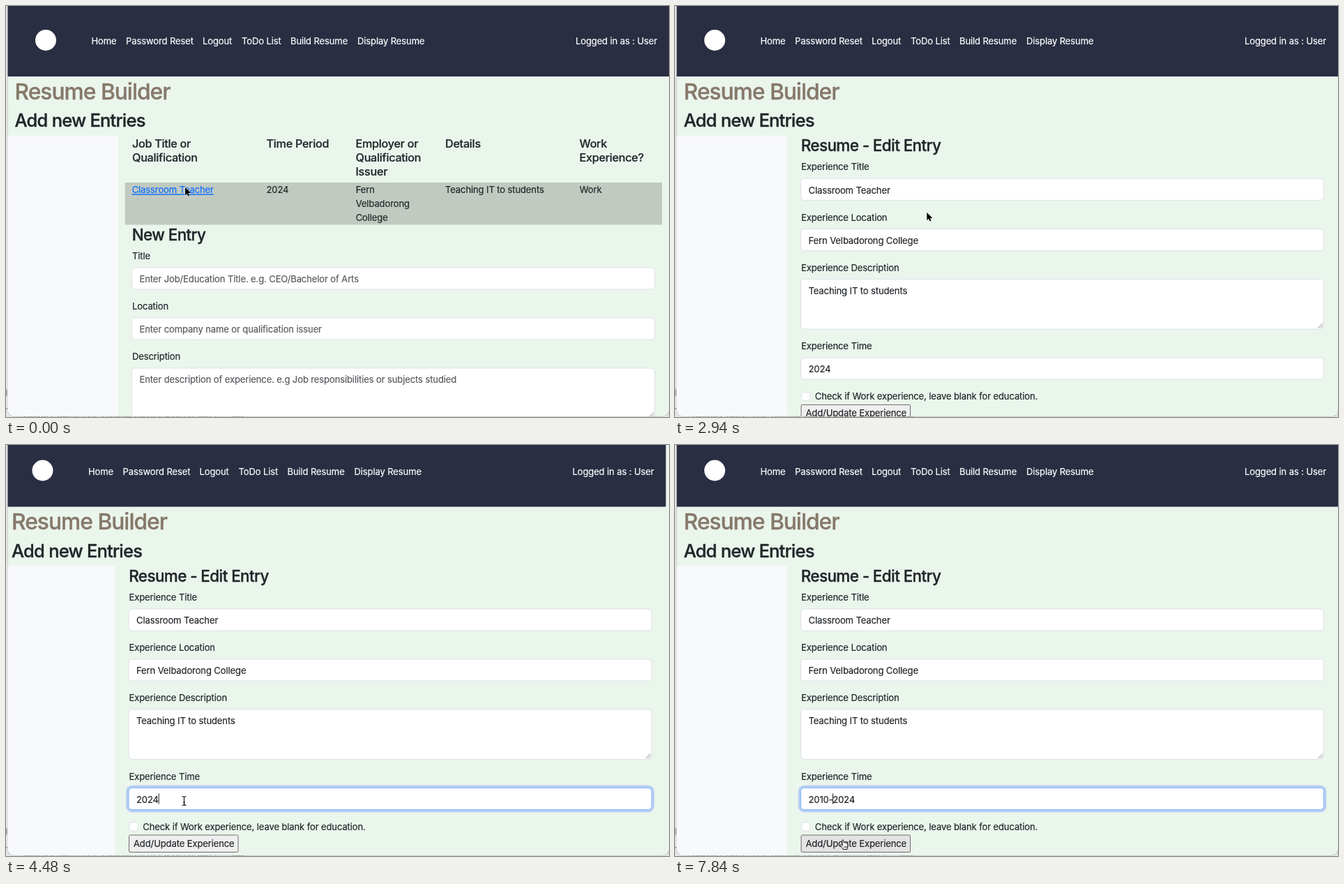
An HTML page for the animation above (8000 ms loop, 951 by 589 pixels).

```html
<!DOCTYPE html>
<html lang="en">
<head>
<meta charset="utf-8">
<title>Resume Builder</title>
<style>
html, body { margin: 0; width: 100%; height: 100%; overflow: hidden; background: #e4e5e7; }
svg { display: block; width: 951px; height: 589px; }
text {
  font: 400 13px Inter, Roboto, sans-serif;
  font-optical-sizing: none;
  letter-spacing: -.008em;
  color: #212529;
  fill: currentColor;
  stroke: currentColor;
  stroke-width: .2px;
  white-space: pre;
}
.nav { color: #fff; }
.h1, .h2, .h3 { font-weight: 500; stroke-width: .35px; }
.h1 { font-size: 31.7px; letter-spacing: -.03em; color: #86786a; }
.h2 { font-size: 25.5px; letter-spacing: -.03em; }
.h3 { font-size: 22.4px; letter-spacing: -.025em; }
.h5 { font-size: 16.2px; font-weight: 500; letter-spacing: -.018em; }
.hint { color: #585b5f; }
.link { color: #0d6efd; text-decoration: underline; }
.link.hover { color: #0a58ca; }
.url { font-size: 10.8px; color: #27303f; }
.behind { font: 9px "Noto Sans Mono", monospace; color: #444; }
.field { fill: #fff; stroke: #dee2e6; }
.grip { fill: none; stroke: #777; stroke-width: .9; }
</style>
</head>
<body>
<svg id="stage" viewBox="0 0 951 589">
  <defs>
    <clipPath id="frame"><rect x="2.5" y="-20" width="948.5" height="608" rx="9"/></clipPath>
  </defs>
</svg>
<script>
const NS = 'http://www.w3.org/2000/svg';
const stage = document.getElementById('stage');

function add(parent, tag, attrs = {}, content) {
  const node = document.createElementNS(NS, tag);
  for (const key in attrs) node.setAttribute(key, attrs[key]);
  if (content !== undefined) node.textContent = content;
  parent.appendChild(node);
  return node;
}
const rect = (parent, x, y, width, height, attrs) => add(parent, 'rect', { x, y, width, height, ...attrs });
const text = (parent, x, y, content, cls = '') => add(parent, 'text', { x, y, class: cls }, content);
const lines = (parent, x, y, list, cls) => list.forEach((s, i) => text(parent, x, y + i * 20, s, cls));

function field(parent, y, height, content, cls) {
  const box = rect(parent, 180.5, y, 750, height, { rx: 5, class: 'field' });
  const label = text(parent, 191.5, y + 21, content, cls);
  if (height > 40) {
    const b = y + height;
    add(parent, 'path', { d: `M922.5 ${b - 1.5}l6.5-6.5M926 ${b - 1.5}l3-3`, class: 'grip' });
  }
  return { box, label };
}

// Behind the window
add(stage, 'circle', { cx: -4, cy: 554, r: 7, fill: '#a9a9ab' });
rect(stage, 0, 576.5, 3, 1, { fill: '#555' });
text(stage, 25, 590, 'contents tools, list training entries details, notes.   page  ', 'behind');
rect(stage, 2, -20, 949.5, 608.5, { rx: 9, fill: '#b4b6ba' });

// Page
const win = add(stage, 'g', { 'clip-path': 'url(#frame)' });
rect(win, 0, 0, 951, 589, { fill: '#eaf5ec' });
const page = add(win, 'g');
rect(page, 0, 0, 951, 101, { fill: '#2a2e43' });
add(page, 'circle', { cx: 57, cy: 49, r: 15, fill: '#fff' });
[[122.5, 'Home'], [172, 'Password Reset'], [282, 'Logout'], [338, 'ToDo List'],
  [408, 'Build Resume'], [504, 'Display Resume']].forEach(([x, s]) => text(page, x, 55, s, 'nav'));
text(page, 934, 55, 'Logged in as : User', 'nav').setAttribute('text-anchor', 'end');
text(page, 12.5, 133.5, 'Resume Builder', 'h1');
text(page, 12.5, 173.3, 'Add new Entries', 'h2');
rect(page, 0, 185.5, 161, 440, { fill: '#f8f9fb' });

// Entry list
const list = add(page, 'g');
[[181, ['Job Title or', 'Qualification']], [373.5, ['Time Period']],
  [501.5, ['Employer or', 'Qualification', 'Issuer']], [630, ['Details']],
  [822.5, ['Work', 'Experience?']]].forEach(([x, s]) => lines(list, x, 202.5, s, 'h5'));
rect(list, 170.7, 253, 770.3, 60.5, { fill: '#c1cac1' });
const link = text(list, 180.7, 268.4, 'Classroom Teacher', 'link');
text(list, 373.5, 268.4, '2024');
lines(list, 501.7, 268.4, ['Fern', 'Velbadorong', 'College']);
text(list, 630, 268.4, 'Teaching IT to students');
text(list, 822.7, 268.4, 'Work');
text(list, 180.7, 336, 'New Entry', 'h3');
text(list, 181, 363, 'Title');
field(list, 375, 31, 'Enter Job/Education Title. e.g. CEO/Bachelor of Arts', 'hint');
text(list, 181, 435, 'Location');
field(list, 447, 31, 'Enter company name or qualification issuer', 'hint');
text(list, 181, 507.4, 'Description');
field(list, 519, 71.5, 'Enter description of experience. e.g Job responsibilities or subjects studied', 'hint');

// Edit form
const form = add(page, 'g');
text(form, 180.7, 208.3, 'Resume - Edit Entry', 'h3');
text(form, 181, 235.4, 'Experience Title');
field(form, 247.5, 31, 'Classroom Teacher');
text(form, 181, 307.6, 'Experience Location');
field(form, 319.5, 31, 'Fern Velbadorong College');
text(form, 181, 379.8, 'Experience Description');
field(form, 391.5, 71.5, 'Teaching IT to students');
text(form, 181, 492.3, 'Experience Time');
const ring = rect(form, 178.5, 502, 754, 35, { rx: 7, fill: 'none', stroke: '#b4cdf3', 'stroke-width': 3.6 });
const year = field(form, 504, 31, '2024');
const caret = rect(form, 0, 512, 1, 15, { fill: '#111' });
rect(form, 181.5, 553.5, 12, 12, { rx: 3, class: 'field' });
text(form, 200.8, 564.4, 'Check if Work experience, leave blank for education.');
const button = rect(form, 181, 571.5, 156.5, 24.5, { rx: 1.5, stroke: '#6f6f6f' });
text(form, 187.5, 588.4, 'Add/Update Experience');

const thumb = rect(win, 943.5, 0, 6, 547, { rx: 3, fill: '#000', 'fill-opacity': .5 });
const status = add(win, 'g');
rect(status, 0, 571, 158.5, 20, { rx: 3, fill: '#d3e3fd', stroke: '#bccbe2', 'stroke-width': .6 });
text(status, 6.5, 583.5, '192.0.2.7:8040/entry_alter/52', 'url');

// Pointers, each with its hot spot at 0,0
const pointers = { arrow: add(stage, 'g'), beam: add(stage, 'g'), hand: add(stage, 'g') };
add(pointers.arrow, 'path', {
  d: 'M0 0V11.2L2.6 8.8L4.3 12.6L6.2 11.8L4.6 8.1H8.2Z',
  fill: '#000', stroke: '#fff', 'stroke-width': 1, 'paint-order': 'stroke'
});
for (const [stroke, width] of [['#fff', 2.4], ['#111', 1.1]]) {
  add(pointers.beam, 'path', {
    d: 'M-3-6.5Q0-6.5 0-4.5Q0-6.5 3-6.5M0-4.5V4.5M-3 6.5Q0 6.5 0 4.5Q0 6.5 3 6.5M-1.5 2H1.5',
    fill: 'none', stroke, 'stroke-width': width
  });
}
add(pointers.hand, 'path', {
  d: 'M-2.5-5.5C-2.5-7.2-.6-7.2-.4-5.6L.2-2.6C.8-3.6 2-3.2 2.2-2.2C3-2.8 4-2.4 4.1-1.4C5-1.8 5.8-1.2 5.8 0V2.4C5.8 4.2 4.8 5 4.8 7H-1C-1.5 4.8-3.2 3.6-4.6 1.2C-5.2 0-3.8-.8-2.8.2L-1.6 1.4Z',
  fill: '#fff', stroke: '#111', 'stroke-width': 1
});
add(pointers.hand, 'path', { d: 'M.8 2.2V5M2.4 2.2V5M4 2.2V5', stroke: '#111', 'stroke-width': .7 });

// Rows are [time, value]; values between rows are linear
const scrollKeys = [[2940, 0], [3150, 2], [3430, 8], [3640, 11], [3780, 12.5]];
const slideKeys = [[4130, 0], [4480, -4.5], [4550, -4.5], [4760, 0]];
const thumbKeys = [[2940, 0], [3080, 1], [3920, 1], [4200, 0]];
const statusKeys = [[630, 0], [840, 1], [1610, 1], [1890, 0]];
const xKeys = [[0, 257], [560, 249], [1960, 249], [2240, 350], [2870, 350], [2940, 361.3],
  [3150, 352], [3430, 328], [3640, 319.5], [3780, 306], [4060, 255.5], [7280, 255.5], [7700, 241.5], [7840, 242]];
const yKeys = [[0, 260], [560, 262], [2870, 262], [2940, 296],
  [3150, 346], [3430, 425], [3640, 454.5], [3780, 470], [4060, 510], [7280, 510], [7700, 571], [7840, 572.5]];

// [time, typed text, caret index or -1 when hidden]
const typing = [
  [0, '2024', -1], [4060, '2024', 4], [4830, '2024', 0], [5320, '2024', -1],
  [5460, '22024', 1], [5670, '202024', 2], [6160, '202024', -1],
  [6440, '2012024', 3], [6580, '20102024', 4], [6790, '2010-2024', 5],
  [7280, '2010-2024', -1], [7840, '2010-2024', 5]
];

function at(keys, t) {
  const i = keys.findIndex(k => k[0] > t);
  if (i === 0) return keys[0][1];
  if (i < 0) return keys[keys.length - 1][1];
  const [t0, a] = keys[i - 1], [t1, b] = keys[i];
  return a + (b - a) * (t - t0) / (t1 - t0);
}
const show = (node, on) => node.setAttribute('visibility', on ? 'visible' : 'hidden');

function pointerKind(t, y) {
  if (t >= 5460 && t < 7280) return 'none';
  if (t >= 7280) return y > 558 ? 'hand' : y > 524 ? 'arrow' : 'beam';
  return (t >= 2030 && t < 2940) || (t >= 3780 && y > 491) ? 'beam' : 'arrow';
}

function draw(t) {
  const scroll = at(scrollKeys, t);
  const editing = t >= 1540, focused = t >= 4060;
  page.setAttribute('transform', `translate(${at(slideKeys, t)} ${-scroll})`);
  list.setAttribute('display', editing ? 'none' : 'inline');
  form.setAttribute('display', editing ? 'inline' : 'none');
  link.classList.toggle('hover', t >= 490);
  status.setAttribute('opacity', at(statusKeys, t));
  thumb.setAttribute('opacity', at(thumbKeys, t));
  thumb.setAttribute('y', 2 + scroll * 8 / 11);

  show(ring, focused);
  year.box.style.stroke = focused ? '#86b7fe' : '';
  const [, value, index] = typing.filter(k => k[0] <= t).pop();
  if (year.label.textContent !== value) year.label.textContent = value;
  show(caret, index >= 0);
  if (editing && index >= 0) {
    const advance = index ? year.label.getSubStringLength(0, index) : 0;
    caret.setAttribute('x', 191.3 + advance);
  }

  const x = at(xKeys, t), y = at(yKeys, t), kind = pointerKind(t, y);
  for (const name in pointers) {
    show(pointers[name], name === kind);
    pointers[name].setAttribute('transform', `translate(${x} ${y})`);
  }
  button.setAttribute('fill', kind === 'hand' ? '#e3e3e3' : '#efefef');
}

const LOOP = 8000, TICK = 70;
const start = performance.now();
function frame() {
  const t = (performance.now() - start) % LOOP;
  draw(Math.floor(t / TICK) * TICK);
  requestAnimationFrame(frame);
}
frame();
</script>
</body>
</html>
```
